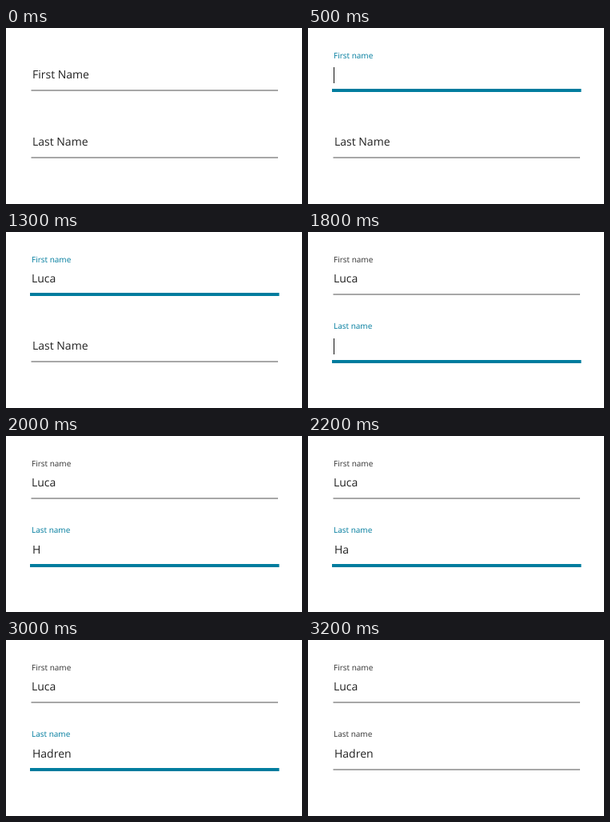
These frames come from a looping animation (370x220 px, 5.2 s). An HTML page:

```html
<!DOCTYPE html>
<html lang="en">
<head>
<meta charset="utf-8">
<title>Floating label form</title>
<style>
  html, body { margin: 0; width: 100%; height: 100%; overflow: hidden; background: #fff; }
  svg { display: block; }
  text { font-family: "Open Sans", "Noto Sans", sans-serif; text-rendering: geometricPrecision; fill: #222; }
  .large { font-size: 14px; }
  .label { font-size: 10px; fill: #333; }
  .rule { stroke: #a8a8a8; stroke-width: 2; }
  .caret { fill: #111; }
  .focus .label { fill: #007c9e; }
  .focus .rule { stroke: #007c9e; stroke-width: 4; }
</style>
</head>
<body>
<svg id="stage" width="370" height="220" viewBox="0 0 370 220"></svg>
<script>
const LOOP = 5200;
const KEY_DELAY = 200;
const HINT_X = 33;
const fields = [
  { hint: "First Name", label: "First name", value: "Luca", valueX: 32, labelY: 38, lineY: 78, focus: 500, blur: 1800 },
  { hint: "Last Name", label: "Last name", value: "Hadren", valueX: 33, labelY: 121, lineY: 162, focus: 1800, blur: 3200 }
];
const stage = document.getElementById("stage");

function add(parent, tag, attrs) {
  const node = document.createElementNS("http://www.w3.org/2000/svg", tag);
  for (const key in attrs) node.setAttribute(key, attrs[key]);
  return parent.appendChild(node);
}

function build(field) {
  const y = field.lineY;
  const group = add(stage, "g", {});
  field.group = group;
  field.labelNode = add(group, "text", { class: "label", x: 32, y: field.labelY });
  field.labelNode.textContent = field.label;
  field.textNode = add(group, "text", { class: "large", y: y - 15 });
  field.caret = add(group, "rect", { class: "caret", x: 32, y: y - 29, width: 1, height: 20 });
  field.rule = add(group, "line", { class: "rule", y1: y, y2: y });
}

function show(node, visible) {
  node.setAttribute("visibility", visible ? "visible" : "hidden");
}

function draw(field, time) {
  const started = time >= field.focus;
  const focused = started && time < field.blur;
  const typed = Math.floor((time - field.focus) / KEY_DELAY);
  field.group.setAttribute("class", focused ? "focus" : "");
  field.textNode.textContent = started ? field.value.slice(0, typed) : field.hint;
  field.textNode.setAttribute("x", started ? field.valueX : HINT_X);
  show(field.labelNode, started);
  show(field.caret, focused && typed === 0);
  field.rule.setAttribute("x1", focused ? 30 : 31.5);
  field.rule.setAttribute("x2", focused ? 341.5 : 340);
}

const start = performance.now();
function tick() {
  const time = (performance.now() - start) % LOOP;
  fields.forEach(field => draw(field, time));
  requestAnimationFrame(tick);
}

fields.forEach(build);
tick();
</script>
</body>
</html>
```
